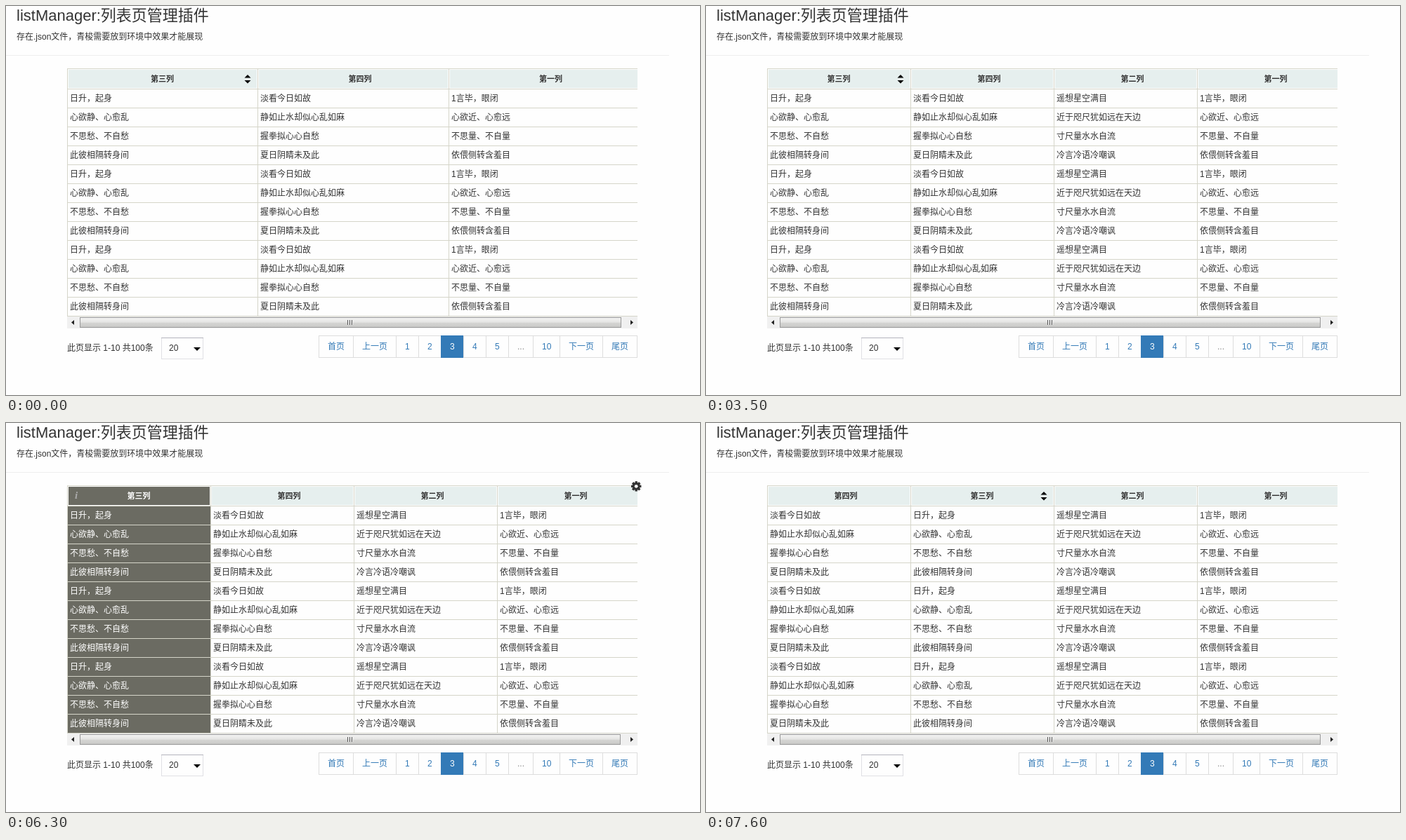
Write an HTML page with a canvas that moves like this. It is 988 px wide and 555 px high and loops after 8000 ms.

```html
<!DOCTYPE html>
<html lang="zh-CN">
<head>
<meta charset="utf-8">
<style>
  html, body { margin: 0; width: 100%; height: 100%; overflow: hidden; background: #fefefe; }
  canvas { display: block; }
</style>
</head>
<body>
<canvas id="stage" width="988" height="555"></canvas>
<script>
const ctx = document.getElementById('stage').getContext('2d', { alpha: false });
const SANS = '"Liberation Sans", "Noto Sans CJK SC", "Noto Sans CJK", sans-serif';
const SERIF = '"Liberation Serif", serif';
const PAPER = '#fefefe', LINE = '#d5d5c9', INK = '#333', DARK = '#6b6b62';
const HOVER = '#8dbbd9', BLUE = '#1296f5', LINK = '#337ab7';
const LOOP = 8000, STEP = 100, LEFT = 87, TOP = 90, ROW = 27, ROWS = 12;
const SHOW = 3000, GRAB = 6300, DROP = 7100, SETTLED = 7500;

const names = { 1: '第一列', 2: '第二列', 3: '第三列', 4: '第四列' };
const cells = {
  1: ['1言毕，眼闭', '心欲近、心愈远', '不思量、不自量', '依偎侧转含羞目'],
  2: ['遥想星空满目', '近于咫尺犹如远在天边', '寸尺量水水自流', '冷言冷语冷嘲讽'],
  3: ['日升，起身', '心欲静、心愈乱', '不思愁、不自愁', '此彼相隔转身间'],
  4: ['淡看今日如故', '静如止水却似心乱如麻', '握拳拟心心自愁', '夏日阴睛未及此']
};

// Invisible pointer: time, x, y. Hovering and dragging follow from it.
const path = [
  [0, 895, 60], [800, 895, 60], [900, 190, 105], [1600, 330, 105], [1800, 760, 112],
  [2000, 850, 112], [2200, 860, 92], [2600, 670, 92], [2800, 600, 92], [2900, 650, 92],
  [3400, 650, 92], [3900, 895, 60], [4000, 880, 92], [4500, 670, 92], [4800, 740, 112],
  [5400, 260, 105], [GRAB, 110, 104], [6800, 474, 146], [6900, 496, 140], [LOOP, 496, 140]
];

const between = (t, from, to) => t >= from && t < to;
const mix = (a, b, k) => a + (b - a) * k;

function pointer(t) {
  const i = path.findIndex(p => p[0] > t), a = path[i - 1], b = path[i];
  const k = (t - a[0]) / (b[0] - a[0]);
  return { x: mix(a[1], b[1], k), y: mix(a[2], b[2], k) };
}

function sceneAt(t) {
  const p = pointer(t), start = pointer(GRAB);
  const dragging = between(t, GRAB, SETTLED);
  const swapped = t >= GRAB && p.x > 291;
  const order = t < SHOW ? [3, 4, 1] : swapped ? [4, 3, 2, 1] : [3, 4, 2, 1];
  const width = t < SHOW ? 271.5 : 204;
  const menu = between(t, 500, 3500) || between(t, 4000, 4900);
  const gear = between(t, 500, 3500) || between(t, 4000, 7600);
  const inMenu = menu && between(p.x, 541, 887) && between(p.y, 79, 103);
  const inHead = !inMenu && !dragging && between(p.y, TOP, TOP + 28) && between(p.x, LEFT, 889);
  const k = Math.max(0, (t - DROP) / (SETTLED - DROP));
  const ease = .5 - Math.cos(k * Math.PI) / 2;
  return {
    t, dragging, swapped, order, width, menu, gear,
    item: inMenu ? Math.floor((p.x - 464) / 85) : 0,
    head: inHead ? order[Math.floor((p.x - LEFT) / width)] : 0,
    dx: mix(p.x - start.x, width, ease),
    dy: mix(p.y - start.y, 0, ease)
  };
}

function rect(x, y, w, h, fill) {
  ctx.fillStyle = fill;
  ctx.fillRect(x, y, w, h);
}
function frame(x, y, w, h, color) {
  ctx.strokeStyle = color;
  ctx.lineWidth = 1;
  ctx.strokeRect(x + .5, y + .5, w - 1, h - 1);
}
function text(str, x, y, color = INK, font = '12px ' + SANS, align = 'left') {
  ctx.font = font;
  ctx.textAlign = align;
  ctx.fillStyle = color;
  ctx.fillText(str, x, y);
}
function disc(x, y, r, color) {
  ctx.fillStyle = color;
  ctx.beginPath();
  ctx.arc(x, y, r, 0, 7);
  ctx.fill();
}
// Triangle with its tip at (x, y), reaching back by (dx, dy) and spread to both sides.
function arrow(x, y, dx, dy, spread, color = '#000') {
  const sx = dy ? spread : 0, sy = dx ? spread : 0;
  ctx.fillStyle = color;
  ctx.beginPath();
  ctx.moveTo(x, y);
  ctx.lineTo(x + dx + sx, y + dy + sy);
  ctx.lineTo(x + dx - sx, y + dy - sy);
  ctx.fill();
}

function page() {
  rect(0, 0, 988, 555, PAPER);
  text('listManager:列表页管理插件', 15, 21, INK, '22px ' + SANS);
  text('存在.json文件，青梭需要放到环境中效果才能展现', 15, 48);
  rect(0, 70, 944, 1, '#eee');
}

function column(id, x, w, { dark, hover, sort, info, shift = 0 }) {
  const ink = dark ? '#fff' : INK;
  if (dark) rect(x + 1, TOP + 29, w - 1, ROW * ROWS - 1, DARK);
  rect(x + 2, TOP + 1, w - 3, 26, dark ? DARK : hover ? HOVER : '#e6efee');
  text(names[id], x + w / 2 + shift, TOP + 18, ink, 'bold 11px ' + SANS, 'center');
  if (info) text('i', x + 11, TOP + 18, dark ? '#aaa' : '#666', 'italic bold 15px ' + SERIF);
  if (sort) {
    arrow(x + w - 14, 98, 0, 4.5, 4.5);
    arrow(x + w - 14, 110.5, 0, -4.5, 4.5);
  }
  for (let r = 0; r <= ROWS; r++) {
    rect(x, TOP + 28 + r * ROW, w, 1, LINE);
    if (r < ROWS) text(cells[id][r % 4], x + 4, TOP + 46 + r * ROW, ink);
  }
  rect(x, TOP - 1, w, 1, LINE);
  rect(x, TOP - 1, 1, ROWS * ROW + 30, LINE);
}

function clone(dx, dy) {
  ctx.save();
  ctx.translate(Math.round(dx), Math.round(dy));
  rect(LEFT, TOP - 2, 202, 380, PAPER);
  column(3, LEFT, 201, { hover: true });
  frame(LEFT, TOP - 2, 202, 380, '#ccc');
  frame(LEFT + 1, TOP - 1, 200, 380, '#ddd');
  ctx.restore();
}

function table(s) {
  ctx.save();
  ctx.beginPath();
  ctx.rect(LEFT, 80, 812, 363);
  ctx.clip();
  s.order.forEach((id, i) => {
    const x = Math.floor(LEFT + i * s.width), next = Math.floor(LEFT + (i + 1) * s.width);
    const dark = s.dragging && id === 3;
    ctx.globalAlpha = id === 2 ? Math.min(1, (s.t - SHOW + STEP) / 500) : 1;
    column(id, x, next - x, {
      dark,
      hover: id === s.head,
      sort: id === 3 && !dark,
      info: id === s.head || dark && !s.swapped,
      shift: id === 3 ? 0 : 10
    });
  });
  ctx.globalAlpha = 1;
  if (s.dragging && s.t > GRAB) clone(s.dx, s.dy);
  ctx.restore();
}

function scrollbar(t) {
  const w = t < SHOW ? 771 : 770;
  rect(LEFT, 443, 812, 17, '#f0f0f0');
  const g = ctx.createLinearGradient(0, 445, 0, 459);
  g.addColorStop(0, '#f3f3f3');
  g.addColorStop(.45, '#e4e4e2');
  g.addColorStop(.5, '#d5d5d3');
  g.addColorStop(1, '#c8c8c6');
  rect(105, 444, w, 15, g);
  frame(105, 444, w, 15, '#999');
  for (let x = 486; x < 495; x += 3) {
    rect(x, 448, 1, 7, '#555');
    rect(x + 1, 448, 1, 7, '#eee');
  }
  arrow(93, 451.5, 4, 0, 3.5, '#222');
  arrow(893, 451.5, -4, 0, 3.5, '#222');
}

function footer() {
  text('此页显示 1-10 共100条', LEFT, 492);
  frame(221, 473, 60, 31, '#e0e0e4');
  rect(221, 473, 60, 1, '#b4b4bc');
  text('20', 232, 492);
  arrow(272, 492, 0, -5, 5);

  let x = 445;
  for (const label of ['首页', '上一页', 1, 2, 3, 4, 5, '...', 10, '下一页', '尾页']) {
    ctx.font = '12px ' + SANS;
    const w = Math.round(ctx.measureText(label).width) + 25, active = label === 3;
    if (active) rect(x, 470, w + 1, 32, LINK);
    else frame(x, 470, w + 1, 32, '#ddd');
    text(label, x + 13, 490, active ? '#fff' : label === '...' ? '#888' : LINK);
    x += w;
    if (active) rect(x, 470, 1, 32, LINK);
  }
}

function menu(s) {
  ctx.fillStyle = '#f8f8f8';
  ctx.strokeStyle = '#d8d8d8';
  ctx.lineWidth = 1;
  ctx.beginPath();
  ctx.roundRect(541.5, 79.5, 345, 23, 3);
  ctx.fill();
  ctx.stroke();
  for (let id = 1; id <= 4; id++) {
    const x = 476 + id * 85, hot = id === s.item;
    disc(x, 92, 7, hot ? BLUE : '#999');
    disc(x, 92, 6, PAPER);
    if (id !== 2 || s.t >= SHOW) disc(x, 92, 4.7, BLUE);
    text(names[id], x + 11, 95, hot ? BLUE : '#666');
  }
}

function gear() {
  ctx.save();
  ctx.translate(897.2, 90.3);
  for (let i = 0; i < 8; i++) {
    rect(-1.7, -7.2, 3.4, 4, INK);
    ctx.rotate(Math.PI / 4);
  }
  disc(0, 0, 5.5, INK);
  disc(0, 0, 2.4, PAPER);
  ctx.restore();
}

function draw(now) {
  const s = sceneAt(Math.floor(now % LOOP / STEP) * STEP);
  page();
  table(s);
  scrollbar(s.t);
  footer();
  if (s.menu) menu(s);
  if (s.gear) gear();
  requestAnimationFrame(draw);
}
requestAnimationFrame(draw);
</script>
</body>
</html>
```
